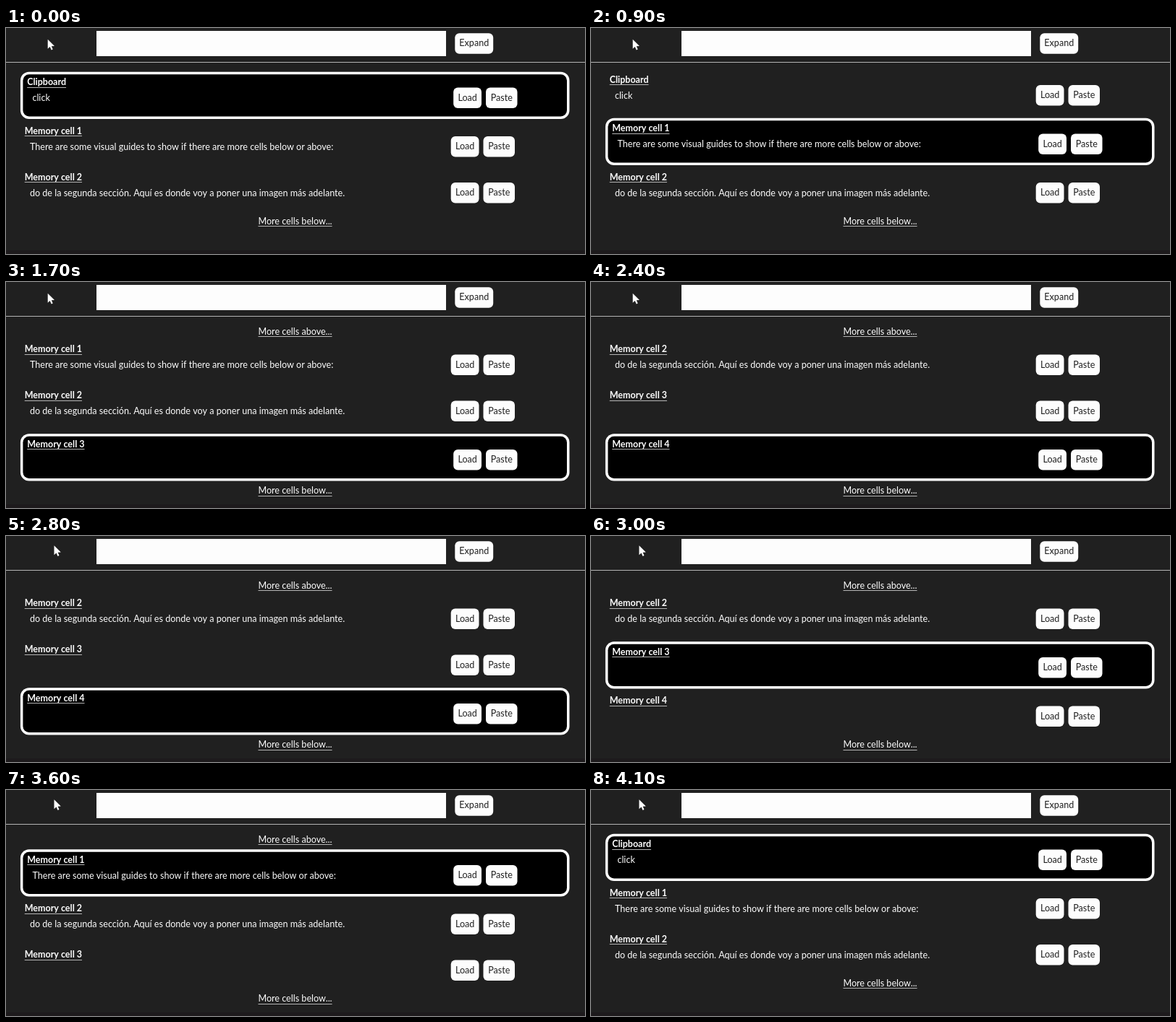
Recreate the animation shown at these times as an HTML page with a canvas. Size 800 by 313 pixels, loop 4.4 s.

```html
<!DOCTYPE html>
<html lang="en">
<head>
<meta charset="utf-8">
<title>Memory cells</title>
<style>
  html, body { margin: 0; width: 100%; height: 100%; overflow: hidden; background: #202020; }
  canvas { display: block; width: 800px; height: 313px; }
</style>
</head>
<body>
<canvas id="stage" width="800" height="313"></canvas>
<script>
const ctx = document.getElementById('stage').getContext('2d');
const LOOP = 4400;
const REGULAR = '12.58px Lato, sans-serif';
const BOLD = 'bold 12.5px Lato, sans-serif';
const WHITE = '#fdfdfd';
const LINE = '#b4b4b4';

const cells = [
  ['Clipboard', 'click'],
  ['Memory cell 1', 'There are some visual guides to show if there are more cells below or above:'],
  ['Memory cell 2', 'do de la segunda sección. Aquí es donde voy a poner una imagen más adelante.'],
  ['Memory cell 3', ''],
  ['Memory cell 4', '']
];

// start time, first visible cell, selected cell
const steps = [
  [0, 0, 0], [900, 0, 1], [1300, 0, 2], [1700, 1, 3], [2400, 2, 4],
  [3000, 2, 3], [3300, 2, 2], [3600, 1, 1], [4100, 0, 0]
];

function text(str, x, y, font, color = WHITE, align = 'left') {
  ctx.font = font;
  ctx.fillStyle = color;
  ctx.textAlign = align;
  ctx.fillText(str, x, y);
}

function underlined(str, x, y, font) {
  text(str, x, y, font);
  ctx.fillStyle = LINE;
  ctx.fillRect(x, Math.floor(y + 3), ctx.measureText(str).width, 1);
}

function roundRect(x, y, w, h, r, color) {
  ctx.fillStyle = color;
  ctx.beginPath();
  ctx.roundRect(x, y, w, h, r);
  ctx.fill();
}

function button(label, x, y, w) {
  roundRect(x, y, w, 28.5, 6, WHITE);
  text(label, x + w / 2, y + 18, REGULAR, '#202020', 'center');
}

function hint(str, y) {
  ctx.font = REGULAR;
  underlined(str, 399.5 - ctx.measureText(str).width / 2, y, REGULAR);
}

function cell([title, body], top, selected) {
  const d = selected ? 3.5 : 0;
  if (selected) {
    roundRect(19.9, top - 0.3, 758.6, 65.2, 12, '#fff');
    roundRect(23.4, top + 3.2, 751.6, 58.2, 8.5, '#000');
  }
  const y = top + d;
  underlined(title, 25.7 + d, y + 14.5, BOLD);
  text(body, 32.9 + d, y + 36.5, REGULAR);
  button('Load', 614.7 + d, y + 18, 38.8);
  button('Paste', 659.5 + d, y + 18, 43.5);
}

function cursor(x, y) {
  ctx.fillStyle = '#fff';
  ctx.beginPath();
  [[0, 0], [0, 13], [3, 10.2], [5, 14.6], [7, 13.7], [5.1, 9.5], [9.3, 9.3]]
    .forEach(([dx, dy]) => ctx.lineTo(x + dx, y + dy));
  ctx.fill();
}

function header() {
  ctx.fillStyle = WHITE;
  ctx.fillRect(125, 4, 483, 35);
  button('Expand', 620.3, 7.2, 52.9);
  ctx.fillStyle = LINE;
  ctx.fillRect(0, 47, 800, 1);
}

function draw(t) {
  const [, first, chosen] = steps.findLast(s => s[0] <= t);
  ctx.fillStyle = '#202020';
  ctx.fillRect(0, 0, 800, 313);
  ctx.fillStyle = '#1d1a1c';
  ctx.fillRect(0, 308, 800, 5);
  header();

  let top = 61;
  if (first > 0) {
    hint('More cells above...', 72.5);
    top += 21.5;
  }
  for (let i = first; i < first + 3; i++) {
    cell(cells[i], top, i === chosen);
    top += i === chosen ? 71 : 64;
  }
  hint('More cells below...', top + 11.5);

  if (t < 2800) cursor(57.7, 15.8);
  else cursor(66.5, 13.3);
}

const start = performance.now();
function tick() {
  draw((performance.now() - start) % LOOP);
  requestAnimationFrame(tick);
}
tick();
</script>
</body>
</html>
```
